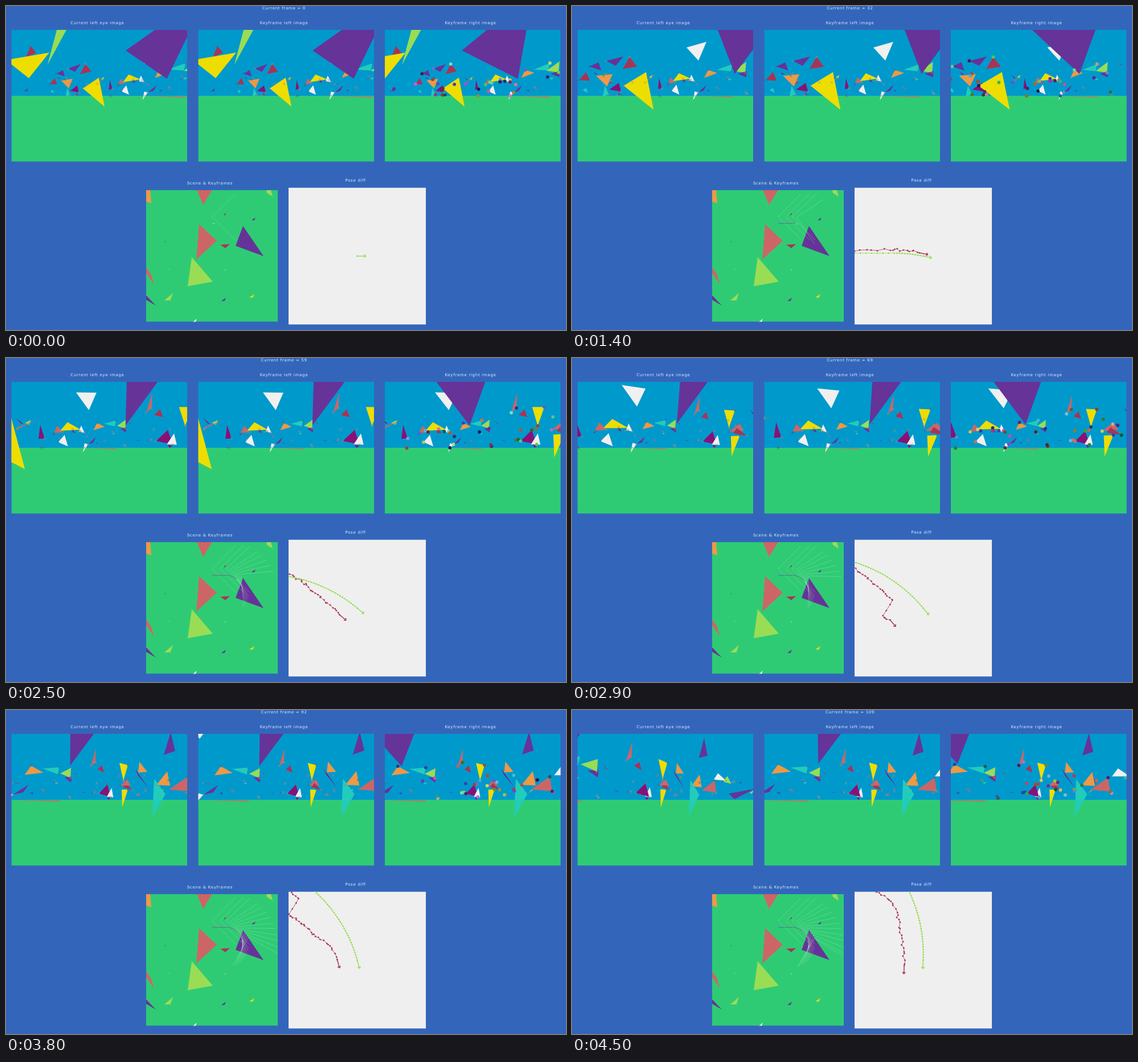
An HTML page with a canvas for the animation above (4600 ms loop, 983 by 570 pixels).

```html
<!DOCTYPE html>
<html>
<head>
<meta charset="utf-8">
<style>
html, body { margin: 0; width: 100%; height: 100%; overflow: hidden; background: #3366bb; }
canvas { position: absolute; left: 0; top: 0; }
p { position: absolute; margin: 0; transform: translate(-50%, -50%); white-space: pre;
  font: 7px/10px "DejaVu Sans", sans-serif; letter-spacing: .7px; color: #e4eefa; }
</style>
</head>
<body>
<canvas id="stage" width="983" height="570"></canvas>
<p id="counter" style="left:488px;top:3.5px"></p>
<p style="left:160.5px;top:29.5px">Current left eye image</p>
<p style="left:488px;top:29.5px">Keyframe left image</p>
<p style="left:815.5px;top:29.5px">Keyframe right image</p>
<p style="left:358px;top:311.5px">Scene &amp; Keyframes</p>
<p style="left:613.5px;top:306.5px">Pose diff</p>
<script>
const g = document.getElementById('stage').getContext('2d');
const counter = document.getElementById('counter');
const PURPLE = '#663399', YELLOW = '#eedd00', LIME = '#99dd55', RED = '#aa3355', CORAL = '#cc6666',
  ORANGE = '#ee9944', TEAL = '#22ccbb', WHITE = '#f0f0f0', PLUM = '#881177', GRASS = '#2fcb74';
const { sin, cos, PI } = Math;
const LEFT = -1, RIGHT = 1;
const FOCAL = 154, MID_X = 164, HORIZON = 158, NEAR = 1;
const keyframes = [0, 12, 22, 32, 38, 45, 52, 59, 65, 72, 78, 85, 91, 94];

const noise = n => { const s = sin(n * 127.1 + 3.7) * 43758.5453; return s - Math.floor(s); };
const frameAt = step => step < 7 ? 2 * step : Math.round(2.5 * step - 3.5);

// The rig drives straight ahead, then turns right on a circle. Units are map pixels.
const TURN = 21, SPEED = 1.15, RADIUS = 29.5, HALF_BASE = 11.5;
const heading = f => Math.max(0, f - TURN) * 1.05 * PI / 180;
function rig(f) {
  const h = heading(f);
  return [362 + SPEED * Math.min(f, TURN) + RADIUS * sin(h), 382.3 + RADIUS * (1 - cos(h))];
}
function eyeAt(f, side) {
  const [x, y] = rig(f), h = heading(f), off = side * HALF_BASE;
  return { x: x - off * sin(h), y: y + off * cos(h), c: cos(h), s: sin(h) };
}
// World point [east, south, height] to [depth, right, height] and back.
function toEye(e, [x, y, up]) {
  const dx = x - e.x, dy = y - e.y;
  return [dx * e.c + dy * e.s, dy * e.c - dx * e.s, up];
}
const toWorld = (e, [z, r, up]) => [e.x + z * e.c - r * e.s, e.y + z * e.s + r * e.c, up];
const toScreen = ([z, r, up]) => [MID_X + FOCAL * r / z, HORIZON - FOCAL * up / z];

const tris = [];
const add = (color, points) => tris.push({ color, points });

// Places triangles in the world as the left eye sees them at time f.
function sight(f) {
  const e = eyeAt(f, LEFT);
  const lift = (x, y, z) => toWorld(e, [z, (x - MID_X) * z / FOCAL, (HORIZON - y) * z / FOCAL]);
  const tri = (color, z, ...p) => add(color, [0, 2, 4].map(i => lift(p[i], p[i + 1], z)));
  const shard = (color, x, y, size) => add(color, [0, 1, 2].map(i => {
    const n = tris.length * 3 + i, a = i * 2.1 + noise(n), r = size * (.7 + .6 * noise(n + 400));
    return lift(x + r * cos(a), y + r * sin(a), 250);
  }));
  return { tri, shard };
}

const ahead = sight(0);
ahead.tri(YELLOW, 118, 0, 95, 76, 82, 40, 127);
ahead.tri(LIME, 107, 95, 20, 118, 20, 73, 103);
ahead.tri(YELLOW, 150, 135, 145, 163, 126, 173, 177);
ahead.tri(PURPLE, 250, 109, 110, 131, 102, 121, 116);
ahead.tri(ORANGE, 250, 97, 131, 117, 128, 110, 145);
ahead.shard(RED, 43, 80, 11);
ahead.shard(PURPLE, 97, 118, 8);
ahead.shard(RED, 140, 115, 10);
ahead.shard(RED, 84, 136, 8);
ahead.shard(TEAL, 109, 152, 7);
ahead.shard(PLUM, 121, 148, 7);

const turning = sight(32);
turning.tri(WHITE, 160, 201, 73, 236, 63, 222, 96);
turning.tri(PLUM, 250, 151, 146, 153, 127, 158, 145);

const halfway = sight(59);
halfway.tri(YELLOW, 250, 95, 128, 108, 113, 131, 126);
halfway.tri(WHITE, 250, 135, 166, 138, 150, 144, 152);
halfway.tri(PURPLE, 250, 144, 152, 158, 139, 153, 149);
halfway.tri(CORAL, 250, 138, 158, 196, 159, 192, 160.5);
halfway.tri(CORAL, 250, 18, 123, 56, 108, 20, 125);
halfway.shard(CORAL, 91, 126, 8);
halfway.shard(WHITE, 134, 127, 8);
halfway.shard(WHITE, 100, 147, 10);

const later = sight(79);
later.tri(ORANGE, 250, 90, 122, 98, 108, 114, 117);
later.tri(TEAL, 250, 113, 111, 136, 107, 134, 118);
later.tri(LIME, 200, 138, 117, 154, 107, 153, 123);
later.tri(PURPLE, 198, 144, 123, 155, 121, 154, 130);

const right = sight(92);
right.tri(CORAL, 250, 149, 98, 158, 67, 157, 92);
right.tri(PLUM, 250, 163, 147, 178, 131, 184, 153);
right.tri(YELLOW, 110, 199, 93, 214, 97, 206, 124);
right.tri(YELLOW, 240, 203, 140, 214, 140, 204, 171);
right.tri(ORANGE, 220, 232, 110, 234, 91, 248, 109);
right.tri(PLUM, 225, 226, 103, 232, 115, 249, 136);
right.tri(ORANGE, 200, 264, 132, 283, 108, 288, 133);
right.tri(TEAL, 148, 260, 121, 280, 148, 257, 188);
right.tri(CORAL, 150, 286, 140, 318, 118, 322, 143);
right.tri(PURPLE, 118, 277, 79, 289, 39, 297, 72);
right.shard(RED, 167, 104, 7);
right.shard(WHITE, 183, 147, 8);
right.shard(CORAL, 209, 131, 11);
right.shard(RED, 213, 134, 9);

const last = sight(109);
last.tri(PURPLE, 250, 275, 147, 320, 139, 285, 157);
last.shard(WHITE, 260, 122, 10);
last.shard(LIME, 273, 124, 10);

const tower = [[416, 387, 28], [452, 440, 17.5], [403, 422, 48.7]];
add(PURPLE, tower);

// Small pieces scattered in the distance.
for (let i = 0; i < 42; i++) {
  const bearing = -.8 + 3.2 * (i + noise(i)) / 42, d = 280 + 120 * noise(i + 60), up = .27 * noise(i + 120);
  const spread = n => d * .05 * (noise(n + i) - .5);
  add([PURPLE, CORAL, TEAL, PLUM, LIME, RED][i % 6], [200, 300, 400].map(n =>
    [400 + d * cos(bearing) + spread(n), 390 + d * sin(bearing) + spread(n + 50), d * up + spread(n + 25)]));
}

function fill(color, points) {
  g.fillStyle = color;
  g.beginPath();
  points.forEach(([x, y]) => g.lineTo(x, y));
  g.fill();
}
function line(color, width, points) {
  g.strokeStyle = color;
  g.lineWidth = width;
  g.beginPath();
  points.forEach(([x, y]) => g.lineTo(x, y));
  g.stroke();
}
function dot(color, x, y, r) {
  g.fillStyle = color;
  g.beginPath();
  g.arc(x, y, r, 0, 7);
  g.fill();
}
function clipped(x, y, w, h, color, draw) {
  g.save();
  g.beginPath();
  g.rect(x, y, w, h);
  g.clip();
  g.fillStyle = color;
  g.fillRect(x, y, w, h);
  draw();
  g.restore();
}

// Cuts away what lies behind the eye.
function cutNear(points) {
  return points.flatMap((a, i) => {
    const b = points[(i + 1) % points.length], out = a[0] >= NEAR ? [a] : [];
    if ((a[0] >= NEAR) !== (b[0] >= NEAR)) {
      const k = (NEAR - a[0]) / (b[0] - a[0]);
      out.push(a.map((v, j) => v + (b[j] - v) * k));
    }
    return out;
  });
}

function mark(x, y, id, side, f) {
  if (side === RIGHT) {
    dot(`hsl(${360 * noise(id + f)},55%,${20 + 50 * noise(id + f + 9)}%)`, x, y, 2.9);
    return;
  }
  const color = ['#a08a88', '#556070', '#c08a70'][id % 3];
  line(color, .8, [[x - 2, y - 2], [x + 2, y + 2]]);
  line(color, .8, [[x - 2, y + 2], [x + 2, y - 2]]);
}

function eyeView(x0, f, side) {
  clipped(x0, 42, 308.5, 231.5, '#0099cc', () => {
    g.fillStyle = GRASS;
    g.fillRect(x0, HORIZON, 309, 116);
    g.translate(x0 - 9.5, 0);
    const e = eyeAt(f, side);
    const seen = tris.map(({ color, points }, id) => {
      const p = points.map(q => toEye(e, q));
      return { color, id, p, depth: (p[0][0] + p[1][0] + p[2][0]) / 3 };
    }).sort((a, b) => b.depth - a.depth);
    for (const { color, p } of seen) fill(color, cutNear(p).map(toScreen));
    for (const { id, p } of seen) p.forEach((q, v) => {
      const n = id * 3 + v;
      if (q[0] < 90 || noise(n + 700) > .28) return;
      const [x, y] = toScreen(q);
      if (y > 85 && y < 180) mark(x, y, n, side, f);
    });
  });
}

function sceneMap(f) {
  const speck = (color, x, y, w, h) => fill(color, [[x, y + h], [x + w, y], [x + w * .7, y + h]]);
  clipped(246, 324, 231, 231.5, GRASS, () => {
    fill(ORANGE, [[246, 324], [253, 324], [255, 347], [246, 344]]);
    fill(CORAL, [[335, 324], [362, 324], [346, 350]]);
    fill(LIME, [[457, 324], [465, 324], [468, 335], [458, 329]]);
    fill(CORAL, [[339, 384], [370, 413], [334, 446]]);
    fill(RED, [[376, 420], [393, 419], [385, 426]]);
    fill(LIME, [[326, 442], [363, 485], [319, 493]]);
    fill(CORAL, [[246, 460], [254, 471], [260, 490], [246, 470]]);
    fill(PURPLE, [[246, 509], [263, 527], [246, 517]]);
    fill(PURPLE, tower);
    speck(RED, 382, 363, 4, 5);
    speck(PURPLE, 431, 372, 7, 5);
    speck(LIME, 278, 505, 15, 13);
    speck(PURPLE, 378, 513, 8, 6);
    speck(YELLOW, 427, 507, 9, 6);
    speck(WHITE, 328, 550, 7, 6);
    speck(LIME, 383, 462, 4, 3);
    speck(LIME, 284, 462, 3, 2);
    speck('#279955', 278, 412, 3, 4);
    for (const k of keyframes.filter(k => k <= f)) {
      const { x, y } = eyeAt(k, LEFT), h = heading(k);
      const ray = a => [x + 57 * cos(h + a), y + 57 * sin(h + a)];
      line('rgba(190,240,195,.38)', .8, [ray(-PI / 4), [x, y], ray(PI / 4)]);
    }
    line('#76579a', 1, Array.from({ length: f + 1 }, (_, k) => rig(k)));
    const [x, y] = rig(f), h = heading(f);
    line('#b8d8c8', .8, [[x, y], [x + 5 * cos(h), y + 5 * sin(h)]]);
  });
}

// Drift of the estimated position in plot pixels: [time, x, y], plus a small jitter.
const drift = [[0, 0, 1], [14, -9, -5], [32, -6, -7], [48, -28, 7], [62, -31, 10],
  [65, -60, 26], [79, -57, 9], [88, -38, -5], [109, -34, 11]];
function error(f) {
  const i = Math.max(1, drift.findIndex(d => d[0] >= f)), [t, x, y] = drift[i - 1], [u, x1, y1] = drift[i];
  const k = (f - t) / (u - t), jitter = n => 5 * (noise(f + n) - .5);
  return [x + (x1 - x) * k + jitter(500), y + (y1 - y) * k + jitter(800)];
}

function arrow(color, [x, y], h) {
  const tip = [x + 15 * cos(h), y + 15 * sin(h)];
  const barb = a => [tip[0] + 4 * cos(h + a), tip[1] + 4 * sin(h + a)];
  line(color, 1.5, [[x, y], tip]);
  line(color, 1.5, [barb(2.4), tip, barb(-2.4)]);
}
function poseDiff(f) {
  clipped(496, 319.5, 241, 241, '#efefef', () => {
    const scale = 254 / RADIUS, [cx, cy] = rig(f);
    const track = (color, offset) => {
      const points = Array.from({ length: f + 1 }, (_, k) => {
        const [x, y] = rig(k), [ex, ey] = offset(k);
        return [616.5 + (x - cx) * scale + ex, 440 + (y - cy) * scale + ey];
      });
      line(color, .8, points);
      points.forEach(([x, y]) => dot(color, x, y, 1.4));
      arrow(color, points[f], heading(f));
    };
    if (f) track(RED, error);
    track(LIME, () => [0, 0]);
  });
}

function draw(now) {
  const f = frameAt(Math.floor(now % 4600 / 100));
  const key = keyframes.filter(k => k <= f).pop();
  counter.textContent = 'Current frame = ' + f;
  g.clearRect(0, 0, 983, 570);
  eyeView(9.5, f, LEFT);
  eyeView(337.5, key, LEFT);
  eyeView(665, key, RIGHT);
  sceneMap(f);
  poseDiff(f);
}
const start = performance.now();
function loop() {
  draw(performance.now() - start);
  requestAnimationFrame(loop);
}
loop();
</script>
</body>
</html>
```
